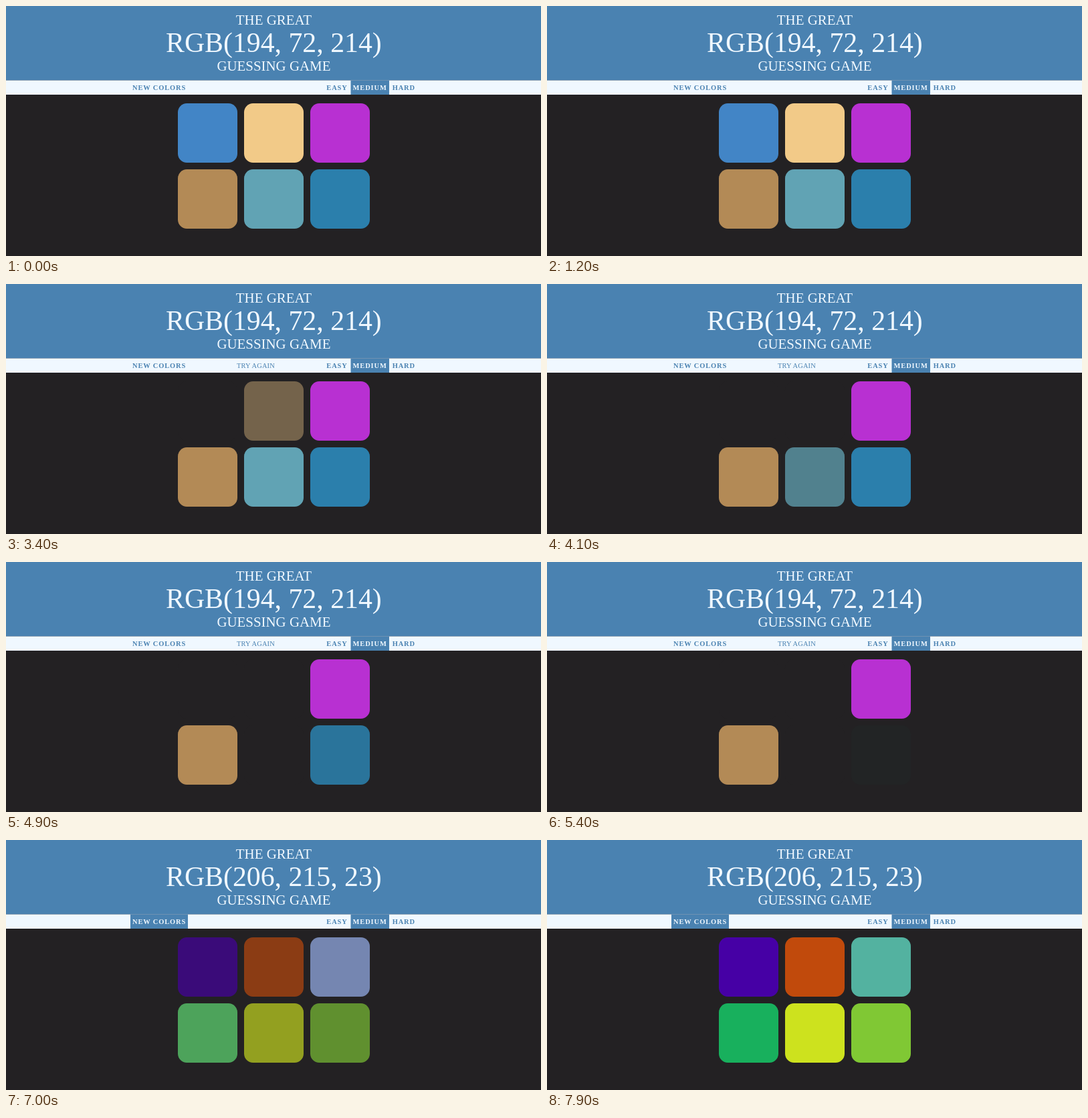
These frames come from a looping animation (800 by 375 pixels, 8000 ms). An HTML page:

```html
<!DOCTYPE html>
<html lang="en">
<head>
<meta charset="utf-8">
<title>Colour guessing game</title>
<style>
  html, body { margin: 0; width: 100%; height: 100%; overflow: hidden; background: #232123; }
  svg { display: block; width: 800px; height: 375px; font-family: "Liberation Serif", "Times New Roman", serif; }
  .head { fill: #f0f8ff; font-size: 20.9px; text-anchor: middle; }
  .head .big { font-size: 41.8px; }
  .nav { fill: #4a82b1; font-size: 10.45px; }
  .nav .btn { font-weight: bold; letter-spacing: .87px; }
</style>
</head>
<body>
<svg viewBox="0 0 800 375">
  <rect width="800" height="111.5" fill="#4a82b1"/>
  <rect y="111.5" width="800" height="21.5" fill="#f0f8ff"/>
  <g class="head">
    <text x="400.4" y="28">THE GREAT</text>
    <text x="400.4" y="69" class="big" id="goal"></text>
    <text x="400.4" y="97">GUESSING GAME</text>
  </g>
  <rect id="hover" x="186" y="111.5" width="86" height="21.5" fill="#4a82b1"/>
  <rect x="515.5" y="111.5" width="57.5" height="21.5" fill="#4a82b1"/>
  <g class="nav">
    <text x="189" y="126" class="btn" id="fresh">NEW COLORS</text>
    <text x="345" y="126" id="message" letter-spacing=".15">TRY AGAIN</text>
    <text x="479.3" y="126" class="btn">EASY</text>
    <text x="518.6" y="126" class="btn" fill="#f0f8ff">MEDIUM</text>
    <text x="577.7" y="126" class="btn">HARD</text>
  </g>
  <g id="board"></g>
</svg>
<script>
const LOOP = 8000, FADE = 600, HOVER = 6200, HOVER_FADE = 300, RESET = 6770;
const DARK = [35, 33, 35], BLUE = [74, 130, 177], PALE = [240, 248, 255];

// Each square: first colour, next colour, time of the wrong guess, colour it fades to
const squares = [
  { from: [66, 133, 198], to: [70, 0, 165], guess: 2200 },
  { from: [242, 202, 136], to: [193, 74, 12], guess: 3190 },
  { from: [184, 48, 210], to: [83, 178, 160] },
  { from: [179, 138, 86], to: [24, 176, 93] },
  { from: [97, 163, 180], to: [205, 226, 30], guess: 3990 },
  { from: [43, 127, 172], to: [128, 200, 52], guess: 4830, gone: [34, 36, 37] }
];

const $ = id => document.getElementById(id);
const bezier = (a, b, s) => 3 * a * s * (1 - s) ** 2 + 3 * b * s * s * (1 - s) + s ** 3;

// The CSS "ease" curve, cubic-bezier(.25, .1, .25, 1)
function ease(x) {
  if (x <= 0) return 0;
  if (x >= 1) return 1;
  let lo = 0, hi = 1;
  for (let i = 0; i < 20; i++) {
    const mid = (lo + hi) / 2;
    if (bezier(.25, .25, mid) < x) lo = mid; else hi = mid;
  }
  return bezier(.1, 1, lo);
}

const mix = (a, b, k) => a.map((v, i) => v + (b[i] - v) * k);
const rgb = c => `rgb(${c.map(Math.round)})`;

squares.forEach((sq, i) => {
  sq.el = document.createElementNS("http://www.w3.org/2000/svg", "rect");
  const box = { x: 257 + i % 3 * 99, y: 146 + Math.floor(i / 3) * 99, width: 89, height: 89, rx: 13.4 };
  for (const key in box) sq.el.setAttribute(key, box[key]);
  $("board").append(sq.el);
});

function draw(t) {
  for (const { el, from, to, guess = Infinity, gone = DARK } of squares) {
    const old = mix(from, gone, ease((t - guess) / FADE));
    el.style.fill = rgb(mix(old, to, ease((t - RESET) / FADE)));
  }
  $("goal").textContent = t < RESET ? "RGB(194, 72, 214)" : "RGB(206, 215, 23)";
  $("message").style.opacity = t >= squares[0].guess && t < RESET ? 1 : 0;
  const hover = ease((t - HOVER) / HOVER_FADE);
  $("hover").style.opacity = hover;
  $("fresh").style.fill = rgb(mix(BLUE, PALE, hover));
}

const start = performance.now();
function tick() {
  draw((performance.now() - start) % LOOP);
  requestAnimationFrame(tick);
}
tick();
</script>
</body>
</html>
```
